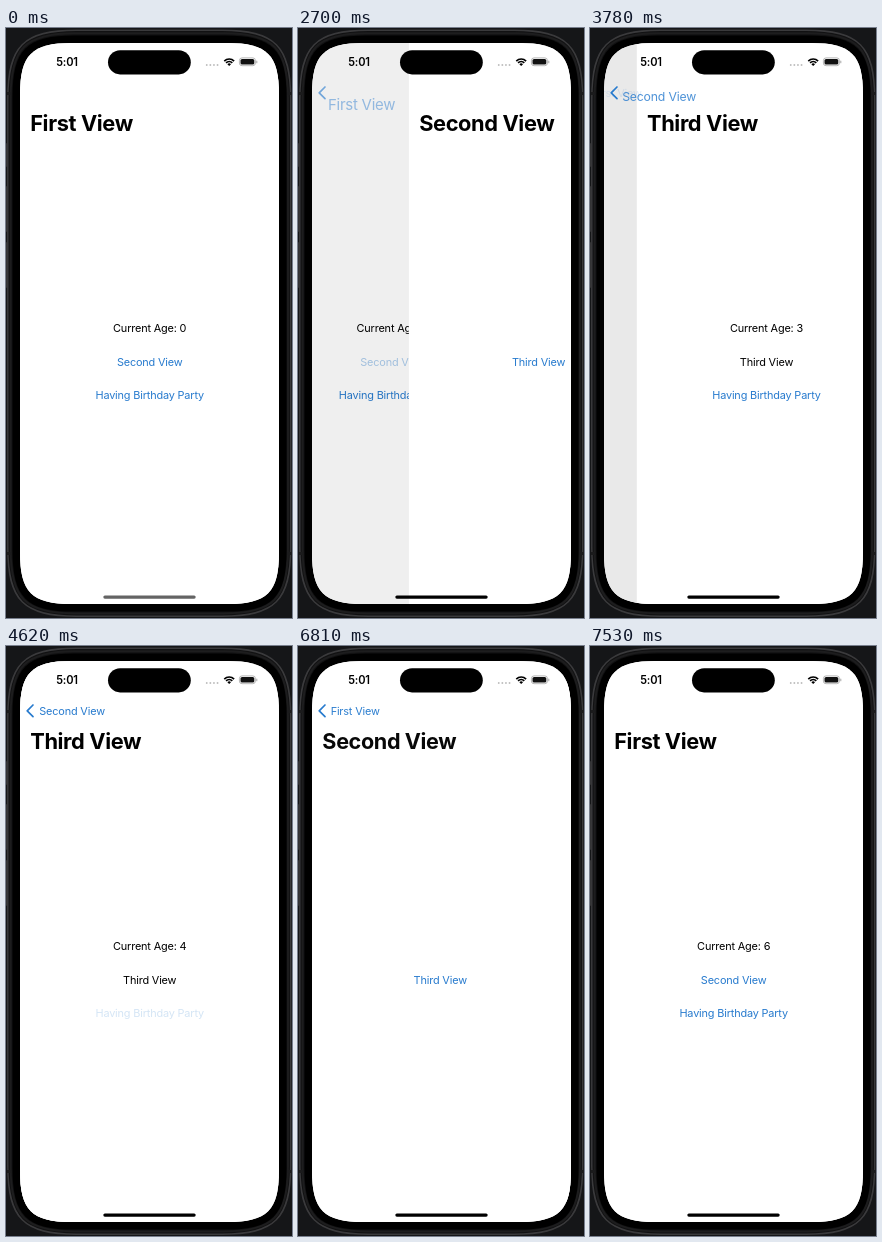
These frames come from a looping animation (286x590 px, 9000 ms). An HTML page with a canvas:

```html
<!DOCTYPE html>
<html lang="en">
<head>
<meta charset="utf-8">
<title>Navigation demo</title>
<style>
  html, body { margin: 0; width: 100%; height: 100%; overflow: hidden; background: #151618; }
  canvas { display: block; width: 286px; height: 590px; }
</style>
</head>
<body>
<canvas id="stage"></canvas>
<script>
const W = 286, H = 590, LOOP = 9000;
const SCREEN = { x: 14, y: 15, w: 259, h: 561, r: 37 };
const MID = 143.7;
const BLUE = '#287bce', INK = '#000';
const BODY = 10.9, TITLE = 21.8;
const TITLE_POS = { x: 24.2, y: 103.3 }, BACK_POS = { x: 33.3, y: 68.8 };
const FAMILY = 'Inter, Roboto, sans-serif';

const PARTY_TAPS = [900, 1380, 1920, 4620, 5040, 5550];
const LINK_TAPS = [2580, 3600];
const BACK_TAPS = [6450, 6960];
const PUSHES = [2600, 3610];
const POPS = [6530, 7040];
const TITLES = ['First View', 'Second View', 'Third View'];

const canvas = document.getElementById('stage');
const ctx = canvas.getContext('2d');
const dpr = window.devicePixelRatio || 1;
canvas.width = W * dpr;
canvas.height = H * dpr;

const clamp = v => Math.min(1, Math.max(0, v));
const mix = (a, b, p) => a + (b - a) * p;

// Critically damped spring from 0 to 1
function spring(ms) {
  if (ms <= 0) return 0;
  const k = ms * 0.021;
  return 1 - (1 + k) * Math.exp(-k);
}

const sum = (times, t) => times.reduce((s, at) => s + spring(t - at), 0);
const depthAt = t => sum(PUSHES, t) - sum(POPS, t);

// Opacity of a button: drops at the tap, holds briefly, fades back
function pressed(taps, t, hold = 40) {
  const last = taps.filter(at => at <= t).pop();
  if (last === undefined) return 1;
  const p = clamp((t - last - hold) / 260);
  return mix(0.2, 1, p * p * (3 - 2 * p));
}

function box(x, y, w, h, r, fill) {
  ctx.beginPath();
  ctx.roundRect(x, y, w, h, r);
  ctx.fillStyle = fill;
  ctx.fill();
}

// Rounded rectangle whose corners ease into the sides
function smoothBox(x, y, w, h, r) {
  const e = r * 1.4, c = e * 0.227;
  const right = x + w, bottom = y + h;
  ctx.beginPath();
  ctx.moveTo(x + e, y);
  ctx.lineTo(right - e, y);
  ctx.bezierCurveTo(right - c, y, right, y + c, right, y + e);
  ctx.lineTo(right, bottom - e);
  ctx.bezierCurveTo(right, bottom - c, right - c, bottom, right - e, bottom);
  ctx.lineTo(x + e, bottom);
  ctx.bezierCurveTo(x + c, bottom, x, bottom - c, x, bottom - e);
  ctx.lineTo(x, y + e);
  ctx.bezierCurveTo(x, y + c, x + c, y, x + e, y);
  ctx.closePath();
}

function fill(color) {
  ctx.fillStyle = color;
  ctx.fill();
}

function stroke(color, width) {
  ctx.strokeStyle = color;
  ctx.lineWidth = width;
  ctx.stroke();
}

function text(str, x, y, { size = BODY, weight = 400, color = INK, align = 'left', alpha = 1, track = -0.0156 } = {}) {
  if (alpha <= 0) return;
  ctx.save();
  ctx.globalAlpha *= alpha;
  ctx.font = `${weight} ${size}px ${FAMILY}`;
  ctx.letterSpacing = `${track * size}px`;
  ctx.textAlign = align;
  ctx.fillStyle = color;
  ctx.fillText(str, x, y);
  ctx.restore();
}

function drawBody() {
  ctx.fillStyle = '#151618';
  ctx.fillRect(0, 0, W, H);
  for (const [y, h] of [[115, 24], [158, 46], [214, 46]]) box(0, y, 2, h, 1, '#333335');
  smoothBox(1, 1.5, 284.5, 587.5, 50);
  fill('#111112');
  smoothBox(1.8, 2.3, 282.9, 585.9, 49);
  stroke('#3a3a3c', 1.5);
  smoothBox(4.6, 5.2, 277.4, 580.2, 46);
  stroke('#1d1d1e', 2);
  smoothBox(6.5, 7.5, 274, 576, 44);
  fill('#000');
  ctx.fillStyle = '#1b1b1c';
  for (const y of [64, 524]) {
    ctx.fillRect(1, y, 4, 3);
    ctx.fillRect(281.5, y, 4, 3);
  }
}

function line(str, y, color = INK, alpha = 1) {
  text(str, MID, y, { color, alpha, align: 'center' });
}

function drawContent(page, t) {
  if (page === 1) {
    line(TITLES[2], 337.7, BLUE, pressed([LINK_TAPS[1]], t));
    return;
  }
  const age = PARTY_TAPS.filter(at => at <= t).length;
  line('Current Age: ' + age, 304.4);
  if (page === 0) line(TITLES[1], 337.7, BLUE, pressed([LINK_TAPS[0]], t));
  else line(TITLES[2], 337.7);
  line('Having Birthday Party', 371, BLUE, pressed(PARTY_TAPS, t));
}

function drawPages(depth, t) {
  for (let page = 0; page < 3; page++) {
    const gap = page - depth;
    if (Math.abs(gap) >= 1) continue;
    ctx.save();
    ctx.translate(gap > 0 ? gap * SCREEN.w : gap * 0.3 * SCREEN.w, 0);
    ctx.fillStyle = '#fff';
    ctx.fillRect(SCREEN.x, SCREEN.y, SCREEN.w + 1, SCREEN.h);
    drawContent(page, t);
    ctx.restore();
    if (gap < 0) {
      ctx.fillStyle = `rgba(0,0,0,${-0.1 * gap})`;
      ctx.fillRect(SCREEN.x, SCREEN.y, SCREEN.w, SCREEN.h);
    }
  }
}

function drawNavBar(depth, t) {
  const tap = pressed(BACK_TAPS, t, 80);
  TITLES.forEach((name, page) => {
    const q = depth - page;
    if (q <= -1 || q >= 2) return;
    const big = { weight: 700, track: -0.017 };
    if (q <= 0) {
      text(name, TITLE_POS.x - q * SCREEN.w, TITLE_POS.y, { ...big, size: TITLE });
    } else if (q <= 1) {
      // The large title shrinks into the back label
      const x = mix(TITLE_POS.x, BACK_POS.x, q), y = mix(TITLE_POS.y, BACK_POS.y, q);
      const size = mix(TITLE, BODY, q);
      text(name, x, y, { ...big, size, alpha: clamp(1 - 1.6 * q) });
      text(name, x, y, { size, color: BLUE, alpha: clamp((q - 0.3) / 0.7) * tap });
    } else {
      text(name, BACK_POS.x - 35 * (q - 1), BACK_POS.y, { color: BLUE, alpha: (2 - q) * tap });
    }
  });

  ctx.save();
  ctx.globalAlpha = clamp(depth) * tap;
  ctx.lineCap = ctx.lineJoin = 'round';
  ctx.beginPath();
  ctx.moveTo(27, 59);
  ctx.lineTo(21.2, 64.8);
  ctx.lineTo(27, 70.6);
  stroke(BLUE, 1.7);
  ctx.restore();
}

function drawWifi(x, y) {
  const a = Math.PI * 1.5, spread = 0.78;
  for (const r of [7, 4.4]) {
    ctx.beginPath();
    ctx.arc(x, y, r, a - spread, a + spread);
    stroke(INK, 1.7);
  }
  ctx.beginPath();
  ctx.moveTo(x, y);
  ctx.arc(x, y, 2.6, a - spread, a + spread);
  fill(INK);
}

function drawStatus(t) {
  box(102, 22.2, 82.8, 24.2, 12.1, '#000');
  text('5:01', 61, 38, { size: 11.1, weight: 600, align: 'center' });
  for (let i = 0; i < 4; i++) box(199.8 + i * 3.6, 36, 1.9, 1.9, 0.95, '#bdbdbd');
  drawWifi(223.2, 38);
  ctx.beginPath();
  ctx.roundRect(233.4, 29.9, 16, 7.8, 2.6);
  stroke('#a5a5a5', 0.8);
  box(234.5, 31, 13.8, 5.6, 1.6, '#111');
  box(250.3, 32.4, 1, 2.8, 0.5, '#a5a5a5');
  box(97.3, 567.5, 92.4, 3.2, 1.6, t < LINK_TAPS[0] ? '#646464' : '#000');
}

function draw(t) {
  const depth = clamp(depthAt(t) / 2) * 2;
  ctx.setTransform(dpr, 0, 0, dpr, 0, 0);
  drawBody();
  ctx.save();
  smoothBox(SCREEN.x, SCREEN.y, SCREEN.w, SCREEN.h, SCREEN.r);
  fill('#fff');
  ctx.clip();
  drawPages(depth, t);
  drawNavBar(depth, t);
  drawStatus(t);
  ctx.restore();
}

const start = performance.now();
function frame() {
  draw((performance.now() - start) % LOOP);
  requestAnimationFrame(frame);
}
frame();
</script>
</body>
</html>
```
